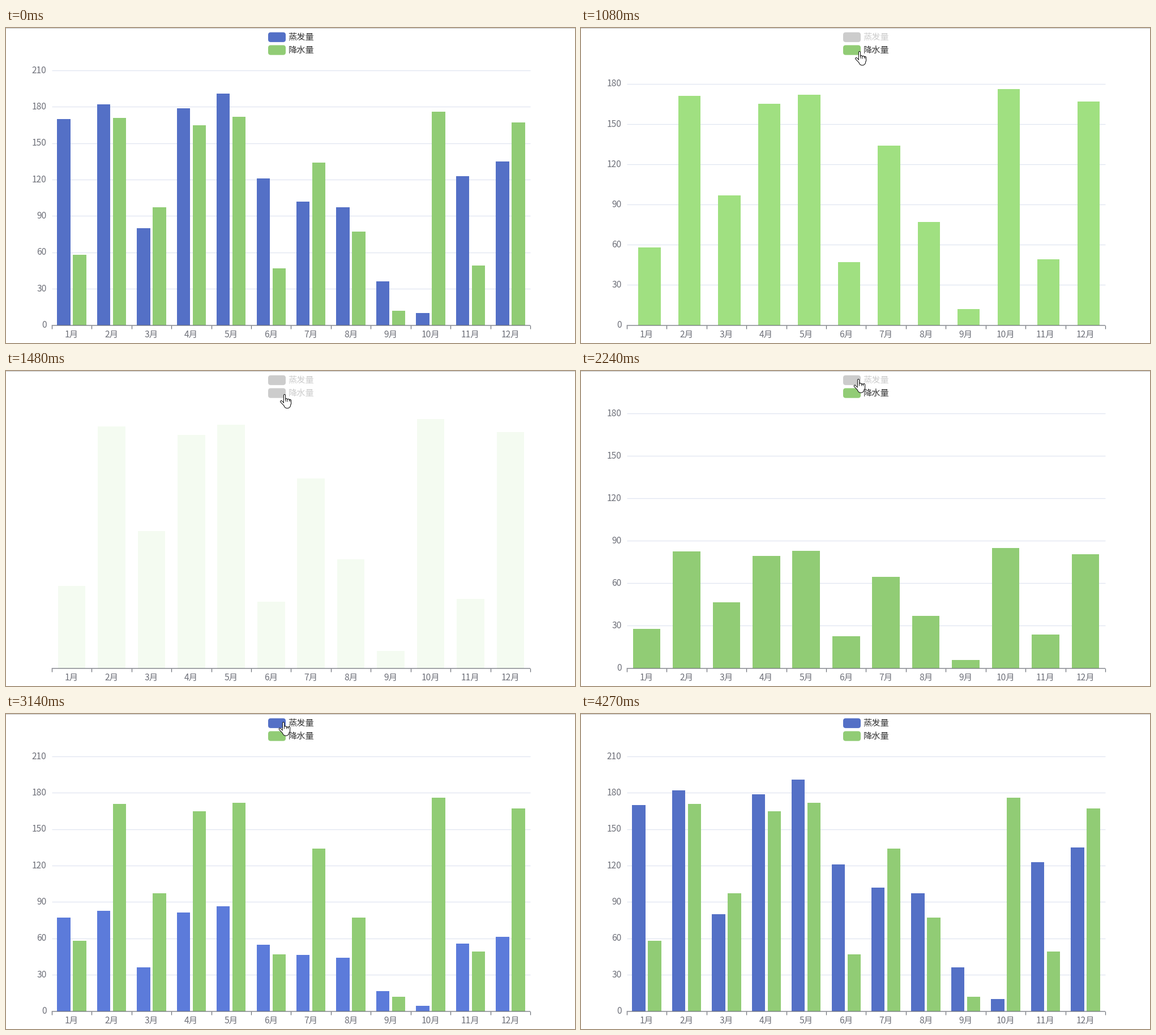
Recreate the animation shown at these times as a matplotlib script. Size 1005 px wide and 557 px high, loop 4390 ms.

```python
import numpy as np
import matplotlib.pyplot as plt
from matplotlib.animation import FuncAnimation
from matplotlib.collections import LineCollection, PolyCollection
from matplotlib.colors import to_rgb
from matplotlib.patches import FancyBboxPatch, Rectangle

W, H, DPI = 1005, 557, 100
LOOP, STEP = 4390, 10
PX = 72 / DPI

LEFT, RIGHT, BASE, SPAN = 80.7, 926.2, 525.5, 450.5
MONTHS = 12
BAND = (RIGHT - LEFT) / MONTHS
WIDE, TALL = SPAN / 210, SPAN / 180  # pixels per unit for either axis range
EVAPORATION = np.array([170, 182, 80, 179, 191, 121, 102, 97, 36, 10, 123, 135])
RAINFALL = np.array([58, 171, 97, 165, 172, 47, 134, 77, 12, 176, 49, 167])

BLUE, GREEN, GRAY = "#5470c6", "#91cc75", "#cccccc"
AXIS, GRID, INK = "#6e7079", "#e0e6f1", "#333333"

# legend clicks and transition lengths, in ms
BLUE_OFF, GREEN_OFF, GREEN_ON, BLUE_ON = 680, 1333, 1529, 2443
UPDATE, FADE, GROW, GLOW = 730, 280, 1440, 220


def mix(a, b, p):
    return a + (b - a) * p


def in_out(u):
    u = min(max(u, 0), 1)
    return 4 * u ** 3 if u < 0.5 else 1 - 4 * (1 - u) ** 3


def out(u):
    return 1 - (1 - min(max(u, 0), 1)) ** 3


def held(now):
    """Moment of the last refresh: every 100 ms, with one longer pause."""
    if now < 1640:
        return min((now - 80) // 100 * 100 + 80, 1480)
    return (now - 40) // 100 * 100 + 40


def slot(count, index):
    """Offset in the band and width of a bar when `count` series are shown."""
    gap = (35 - 4 * count) / 100
    width = BAND * (1 - gap) / (count + 0.2 * (count - 1))
    return BAND * gap / 2 + index * width * 1.2, width


def bar_shapes(heights, offset, width):
    x = LEFT + BAND * np.arange(MONTHS) + offset
    return [[(a, BASE), (a, BASE - h), (a + width, BASE - h), (a + width, BASE)]
            for a, h in zip(x, heights)]


fig = plt.figure(figsize=(W / DPI, H / DPI), dpi=DPI, facecolor="white")
ax = fig.add_axes([0, 0, 1, 1])
ax.set_xlim(0, W)
ax.set_ylim(H, 0)
ax.axis("off")


def add_lines(segments, color, width, zorder, **style):
    return ax.add_collection(LineCollection(
        segments, colors=color, linewidths=width * PX, zorder=zorder, **style))


def add_bars(zorder):
    return ax.add_collection(PolyCollection([], linewidths=0, zorder=zorder))


def label(x, y, text, size, color, ha):
    return ax.text(x, y, text, fontsize=size * PX, color=color, ha=ha,
                   va="baseline", family="Noto Sans CJK JP", zorder=5)


def legend_item(y, name):
    box = FancyBboxPatch((463, y), 31, 17.3, lw=0, zorder=5,
                         boxstyle="round,pad=0,rounding_size=4.5")
    ax.add_patch(box)
    return box, label(498.8, y + 13.6, name, 15.2, INK, "left")


ax.add_patch(Rectangle((0, 0), W, 1, color="#c4c4c4", lw=0))

grid = add_lines([], GRID, 1.25, 1)
values = np.arange(0, 211, 30)
value_labels = [label(71.5, BASE, str(v), 15.6, AXIS, "right") for v in values]

axis_y = BASE + 0.4
add_lines([[(LEFT, axis_y), (RIGHT, axis_y)]], AXIS, 1.25, 4, snap=False)
add_lines([[(x, axis_y), (x, axis_y + 5.6)]
           for x in np.linspace(LEFT, RIGHT, MONTHS + 1)], AXIS, 1.25, 4)
for i in range(MONTHS):
    label(LEFT + BAND * (i + 0.5), 547, f"{i + 1}月", 15.6, AXIS, "center")

green_bars, blue_bars = add_bars(2), add_bars(3)
blue_key, green_key = legend_item(7.6, "蒸发量"), legend_item(30.4, "降水量")

# pointing hand: round strokes in ink, the same ones thinner in white, folds
fingers = [[(8 + 3.4 * i, 8.4 + 0.8 * i if i else 2.3), (8 + 3.4 * i, 17)]
           for i in range(4)]
thumb, palm = [(2.2, 13), (8, 19)], [(12.5, 15), (12.8, 19)]
strokes = np.array([*fingers, thumb, palm])
folds = np.array([[(9.7 + 3.4 * i, 8.5), (9.7 + 3.4 * i, 12.5)] for i in range(3)])
widths = np.array([4.2] * 5 + [13])
hand = [(add_lines([], "#111111", widths, 8, capstyle="round"), strokes),
        (add_lines([], "white", widths - 2.1, 9, capstyle="round"), strokes),
        (add_lines([], "#111111", 0.9, 10), folds)]


def hand_spot(t):
    """Enter over the first key, go down to the second and back up."""
    times = [80, 180, 860, 1000, 1900, 2040]
    return (np.interp(t, times, [490, 481, 481, 484, 484, 481.5]),
            np.interp(t, times, [8, 20, 20, 41, 41, 13.5]))


def paint_key(key, color, on):
    key[0].set_facecolor(color if on else GRAY)
    key[1].set_color(INK if on else GRAY)


def paint_bars(bars, color, lift, alpha):
    bars.set_facecolor([min(c * (1 + 0.1 * lift), 1) for c in to_rgb(color)] + [alpha])


def axis_state(t):
    """Top value of the axis (-1 when hidden) and pixels per unit."""
    if t < BLUE_ON:
        top = 210 if t < BLUE_OFF else -1 if GREEN_OFF <= t < GREEN_ON else 180
        return top, mix(WIDE, TALL, in_out((t - BLUE_OFF) / UPDATE))
    return 210, mix(TALL, WIDE, in_out((t - BLUE_ON) / UPDATE))


def green_state(t):
    """Pixels per unit, share of the full-width layout, opacity."""
    if t < GREEN_ON:
        p = in_out((t - BLUE_OFF) / UPDATE)
        return mix(WIDE, TALL, p), p, 1 - out((t - GREEN_OFF) / FADE)
    grown = TALL * in_out((min(t, BLUE_ON) - GREEN_ON) / GROW)
    p = in_out((t - BLUE_ON) / UPDATE)
    return mix(grown, WIDE, p), 1 - p, 1


def blue_state(t):
    """Pixels per unit, opacity."""
    if t < BLUE_ON:
        return WIDE, 1 - out((t - BLUE_OFF) / FADE)
    return WIDE * in_out((t - BLUE_ON) / GROW), 1


def glow(t, start, end):
    return out((t - start) / GLOW) - out((t - end) / GLOW)


def draw(frame):
    t = held(frame * STEP)

    top, unit = axis_state(t)
    heights = np.minimum(values * unit, SPAN)
    grid.set_segments([[(LEFT, BASE - h), (RIGHT, BASE - h)]
                       for v, h in zip(values, heights) if 0 < v <= top])
    for v, h, text in zip(values, heights, value_labels):
        text.set_visible(v <= top)
        text.set_y(BASE - h + 4.6)

    scale, full, alpha = green_state(t)
    offset, width = (mix(a, b, full) for a, b in zip(slot(2, 1), slot(1, 0)))
    green_bars.set_verts(bar_shapes(RAINFALL * scale, offset, width))
    paint_bars(green_bars, GREEN, glow(t, 860, 1930), alpha)

    scale, alpha = blue_state(t)
    blue_bars.set_verts(bar_shapes(EVAPORATION * scale, *slot(2, 0)))
    paint_bars(blue_bars, BLUE, glow(t, 560, 4040), alpha)

    paint_key(blue_key, BLUE, not BLUE_OFF <= t < BLUE_ON)
    paint_key(green_key, GREEN, not GREEN_OFF <= t < GREEN_ON)

    for part, shape in hand:
        part.set_visible(80 <= t < 3840)
        part.set_segments(shape + hand_spot(t))
    return []


anim = FuncAnimation(fig, draw, frames=LOOP // STEP, interval=STEP,
                     init_func=lambda: draw(0), repeat=True, repeat_delay=0)
plt.show()
```
